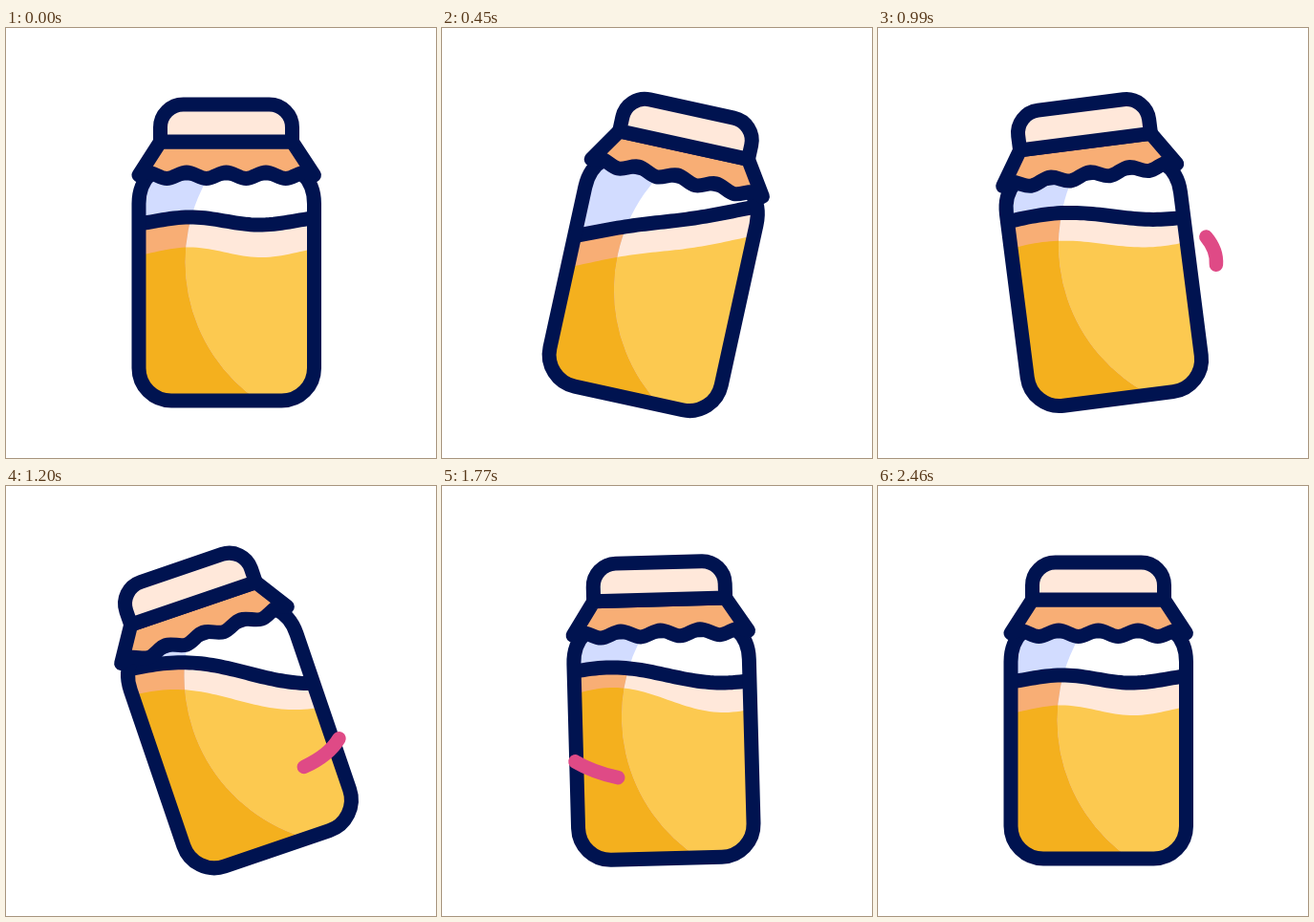
An HTML page with a canvas for the animation above (2940 ms loop, 450 by 450 pixels).

```html
<!DOCTYPE html>
<html lang="en">
<head>
<meta charset="utf-8">
<title>Honey jar</title>
<style>
  html, body { margin: 0; width: 100%; height: 100%; overflow: hidden; background: #fff; }
  canvas { display: block; width: 450px; height: 450px; }
</style>
</head>
<body>
<canvas id="stage" width="450" height="450"></canvas>
<script>
const ctx = document.getElementById('stage').getContext('2d');
const SIZE = 450, LOOP = 2940, STEP = 30;
const PIVOT = SIZE / 2, JAR_X = 231;
const NAVY = '#001350', PINK = '#df4a86', CREAM = '#ffe8da', PEACH = '#f8ae75';
const LIGHT = ['#ffffff', CREAM, '#fcc950'];
const DARK = ['#d2dcff', PEACH, '#f4b01e'];

const body = new Path2D('M152 152C143 160 139 172 139 184V356a34 34 0 0 0 34 34H288.5' +
  'a34 34 0 0 0 34-34V184C322.5 172 318.5 160 309.5 152Z');
const scallop = 'c7 0 13.75 6.5 20.75 6.5s13.75-6.5 20.75-6.5';
const cloth = new Path2D('M161.5 119L139 154L147.5 151' + scallop.repeat(4) +
  'L322.5 154L299.5 119Z');
const cap = new Path2D('M161.5 119V104a24 24 0 0 1 24-24H275.5a24 24 0 0 1 24 24V119Z');
// Everything left of a large circle lies in shade.
const shade = new Path2D();
shade.rect(0, 0, SIZE, SIZE);
shade.arc(363.5, 245, 176, 0, 2 * Math.PI);
const leftSide = new Path2D();
leftSide.rect(0, 0, 300, SIZE);

const smooth = p => p * p * (3 - 2 * p);
const lateSmooth = p => smooth(p ** 1.15);
const easeOut = p => 1 - (1 - p) ** 2;

// Each key: time, values, easing towards it.
const spin = [
  [0, [0]], [700, [19], lateSmooth], [1160, [-19], smooth], [1900, [0], smooth]
];
// Surface values: height, slope, amplitude, wavelength, crest x.
const foamTop = [
  [0, [202, 0, 4, 145, 193]],
  [700, [203.5, -.234, -.6, 145, 193], lateSmooth],
  [1160, [195, .03, 9, 250, 190], smooth],
  [1770, [198, 0, 8, 230, 178], smooth],
  [2130, [202, 0, 4, 145, 193], easeOut]
];
const honeyTop = [
  [0, [234.8, 0, 5.3, 150, 192]],
  [700, [233, -.243, -.8, 150, 192], lateSmooth],
  [1160, [223.5, 0, 10.5, 250, 177], smooth],
  [1770, [224, 0, 13, 232, 179], smooth],
  [2460, [234.8, 0, 5.3, 150, 192], easeOut]
];

function valueAt(keys, t) {
  const i = keys.findIndex(k => k[0] > t);
  if (i < 0) return keys[keys.length - 1][1];
  const [t0, from] = keys[i - 1], [t1, to, ease] = keys[i];
  const p = ease((t - t0) / (t1 - t0));
  return from.map((v, n) => v + (to[n] - v) * p);
}

function surface([height, slope, amp, length, crest], closed) {
  const path = new Path2D();
  for (let x = 60; x <= 400; x += 4) {
    path.lineTo(x, height + slope * (x - JAR_X) - amp * Math.cos(2 * Math.PI * (x - crest) / length));
  }
  if (closed) {
    path.lineTo(400, SIZE);
    path.lineTo(60, SIZE);
    path.closePath();
  }
  return path;
}

function turn(deg) {
  ctx.translate(PIVOT, PIVOT);
  ctx.rotate(deg * Math.PI / 180);
  ctx.translate(-PIVOT, -PIVOT);
}

function outline(path, fill) {
  if (fill) {
    ctx.fillStyle = fill;
    ctx.fill(path);
  }
  ctx.strokeStyle = NAVY;
  ctx.stroke(path);
}

function drawContents(angle, foam, honey, [glass, top, bottom]) {
  ctx.save();
  turn(-angle);
  ctx.fillStyle = glass;
  ctx.fillRect(0, 0, SIZE, SIZE);
  ctx.fillStyle = top;
  ctx.fill(foam);
  ctx.fillStyle = bottom;
  ctx.fill(honey);
  ctx.restore();
}

function drawJar(t) {
  const [angle] = valueAt(spin, t);
  const level = valueAt(foamTop, t);
  const foam = surface(level, true), honey = surface(valueAt(honeyTop, t), true);

  ctx.save();
  turn(angle);
  ctx.lineWidth = 15;

  ctx.save();
  ctx.clip(body);
  drawContents(angle, foam, honey, LIGHT);
  ctx.save();
  ctx.clip(shade, 'evenodd');
  ctx.clip(leftSide);
  drawContents(angle, foam, honey, DARK);
  ctx.restore();
  turn(-angle);
  outline(surface(level, false));
  ctx.restore();

  outline(body);
  outline(cloth, PEACH);
  outline(cap, CREAM);
  ctx.restore();
}

// A dash slides along an ellipse in front of the jar.
const RX = 123, RY = 65, DASH = 48;
const A0 = -24 * Math.PI / 180, A1 = 204 * Math.PI / 180;
const orbit = new Path2D();
orbit.ellipse(JAR_X, 245, RX, RY, 0, A0, A1);
let orbitLength = 0;
for (let i = 0, n = 400, d = (A1 - A0) / n; i < n; i++) {
  const a = A0 + (i + .5) * d;
  orbitLength += Math.hypot(RX * Math.sin(a), RY * Math.cos(a)) * d;
}

function drawSwoosh(t) {
  const head = orbitLength * (t - 888) / 1156;
  if (head <= 0 || head >= orbitLength + DASH) return;
  ctx.save();
  ctx.lineWidth = 14.5;
  ctx.strokeStyle = PINK;
  ctx.setLineDash([DASH, 999]);
  ctx.lineDashOffset = DASH - head;
  ctx.stroke(orbit);
  ctx.restore();
}

ctx.lineCap = ctx.lineJoin = 'round';

function draw() {
  const t = Math.floor(performance.now() % LOOP / STEP) * STEP;
  ctx.fillStyle = '#fff';
  ctx.fillRect(0, 0, SIZE, SIZE);
  drawJar(t);
  drawSwoosh(t);
  requestAnimationFrame(draw);
}
draw();
</script>
</body>
</html>
```
